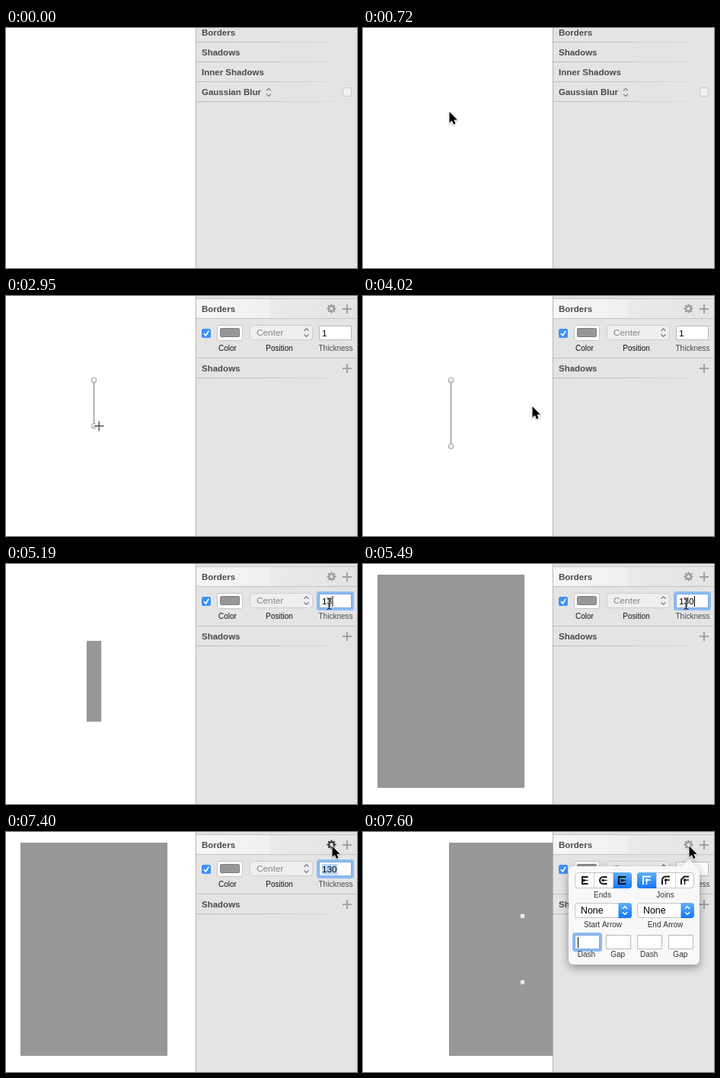
Recreate the animation shown at these times as an HTML page with a canvas. Size 461 px wide and 315 px high, loop 7.99 s.

```html
<!DOCTYPE html>
<html lang="en">
<head>
<meta charset="utf-8">
<title>Border thickness</title>
<style>
html, body { margin: 0; width: 100%; height: 100%; overflow: hidden; background: #fff; }
canvas { display: block; width: 461px; height: 315px; }
</style>
</head>
<body>
<canvas id="stage"></canvas>
<script>
const W = 461, H = 315, LOOP = 7990;
const canvas = document.getElementById('stage');
const c = canvas.getContext('2d');
const dpr = window.devicePixelRatio || 1;
canvas.width = W * dpr;
canvas.height = H * dpr;

const FONT = '"Liberation Sans", Arial, sans-serif';
const GRAY = '#979797', PANEL = '#e4e4e4', BLUE = '#3b91f7';
const UNIT = 1.485;               // screen pixels per unit of thickness
const LINE = { x: 115.5, top: 110.5, bottom: 197.3 };

// Stepped pointer moves: start, end, number of steps, way points
const MOVES = [
  { a: 300, b: 720, n: 9, pts: [[-12, 133], [30, 132], [85, 118], [113.5, 110]] },
  { a: 2360, b: 3150, n: 17, kind: 'cross', pts: [[114.5, 115.5], [117, 140], [122, 168], [123, 190.5]] },
  { a: 3290, b: 3400, n: 4, kind: 'cross', pts: [[123, 190.5], [123, 197.3]] },
  { a: 3720, b: 3720, n: 1, pts: [[123, 197], [122, 196]] },
  { a: 4020, b: 4550, n: 8, pts: [[122, 196], [323, 94], [415, 56], [448, 49], [424.5, 52]] },
  { a: 6690, b: 7400, n: 13, pts: [[424.5, 52], [437, 41], [441, 28], [428.5, 18.5]] }
];

function along(pts, f) {
  const p = f * (pts.length - 1);
  const i = Math.min(Math.floor(p), pts.length - 2);
  const [x0, y0] = pts[i], [x1, y1] = pts[i + 1];
  return [x0 + (x1 - x0) * (p - i), y0 + (y1 - y0) * (p - i)];
}

function pointer(t) {
  const m = MOVES.filter(v => t >= v.a).pop();
  if (!m) return null;
  const k = t >= m.b ? m.n : 1 + Math.floor((t - m.a) / (m.b - m.a) * (m.n - 1));
  const [x, y] = along(m.pts, k / m.n);
  const inField = x > 411 && x < 454 && y > 39 && y < 58;
  return { x, y, kind: m.kind || (inField ? 'beam' : 'arrow') };
}

function text(s, x, y, size, color = '#000', align = 'left', weight = '') {
  c.font = `${weight} ${size}px ${FONT}`;
  c.textAlign = align;
  c.fillStyle = color;
  c.fillText(s, x, y);
}

const heading = (s, y) => text(s, 257, y, 11.5, '#4a4a4a', 'left', 'bold');
const label = (s, x, y, color = '#111') => text(s, x, y, 10, color, 'center');

function rect(x, y, w, h, fill) {
  c.fillStyle = fill;
  c.fillRect(x, y, w, h);
}

function box(x, y, w, h, r, fill, stroke) {
  c.beginPath();
  c.roundRect(x, y, w, h, r);
  if (fill) { c.fillStyle = fill; c.fill(); }
  if (stroke) { c.strokeStyle = stroke; c.lineWidth = 1; c.stroke(); }
}

function poly(pts, color, width) {
  c.beginPath();
  pts.forEach(([x, y]) => c.lineTo(x, y));
  c.strokeStyle = color;
  c.lineWidth = width;
  c.stroke();
}

function gradient(x0, y0, x1, y1, ...stops) {
  const g = c.createLinearGradient(x0, y0, x1, y1);
  stops.forEach(([at, color]) => g.addColorStop(at, color));
  return g;
}

function separator(y) {
  rect(250, y, 180, 1, gradient(250, 0, 430, 0, [0, '#bebebe'], [0.6, '#c6c6c6'], [0.62, '#d2d2d2'], [1, '#dadada']));
}

function chevrons(x, y, color, width = 1.5) {
  for (const d of [-1, 1]) {
    poly([[x - 3, y + d * 2.2], [x, y + d * 5.2], [x + 3, y + d * 2.2]], color, width);
  }
}

function plus(x, y) {
  rect(x - 6, y - 1, 12, 2, '#a0a0a0');
  rect(x - 1, y - 6, 2, 12, '#a0a0a0');
}

function gear(x, y, color) {
  for (let i = 0; i < 8; i++) {
    const a = i * Math.PI / 4, dx = Math.cos(a), dy = Math.sin(a);
    poly([[x + dx * 3.5, y + dy * 3.5], [x + dx * 6, y + dy * 6]], color, 2);
  }
  c.beginPath();
  c.arc(x, y, 3.3, 0, 7);
  c.lineWidth = 2;
  c.stroke();
}

function field(x, y, w, h, focus) {
  if (focus) box(x - 3, y - 3, w + 6, h + 6, 3.5, '#8dbbf2');
  box(x + 0.5, y + 0.5, w - 1, h - 1, 0, '#fff', focus ? '#79a9e4' : '#b9b9b9');
}

function idlePanel() {
  ['Borders', 'Shadows', 'Inner Shadows', 'Gaussian Blur'].forEach((s, i) => {
    heading(s, 10 + 26 * i);
    separator(18 + 26 * i);
  });
  chevrons(345, 84.5, '#777', 1.1);
  box(442.5, 78.5, 11, 11, 2.5, '#f0f0f0', '#c8c8c8');
}

function thicknessField(t) {
  const focus = t >= 4750 && t < 7550;
  const value = t < 5140 ? '1' : t < 5490 ? '13' : '130';
  field(411, 39, 43, 19, focus);
  if (focus && t >= 6180) rect(415, 42, 20.5, 14, '#b2d6fd');
  text(value, 415, 53, 11.8);
  if (focus && t < 6030) rect(415.5 + value.length * 6.5, 42, 1, 14, '#000');
}

function borderPanel(t, hover) {
  rect(250, 4, 211, 25, gradient(250, 0, 461, 0, [0, '#f6f6f6'], [0.46, '#f0f0f0'], [0.465, '#eaeaea'], [1, '#e4e4e4']));
  rect(250, 3, 211, 1, '#c4c4c4');
  rect(250, 29, 211, 1, '#c4c4c4');
  heading('Borders', 21);
  gear(427.5, 16.5, hover ? '#303030' : '#969696');
  plus(448, 17);

  box(257, 43, 12, 12, 2.5, BLUE);
  poly([[260, 49], [262.4, 52], [266.3, 45.6]], '#fff', 1.6);
  box(277.5, 38.5, 33, 20, 3, '#fff', '#c2c2c2');
  box(281.5, 42.5, 25, 11, 1, GRAY, '#7c7c7c');
  box(320.5, 38.5, 82, 19, 3.5, '#efefef', '#cecece');
  text('Center', 329, 52.3, 11.8, '#858585');
  chevrons(394.5, 48, '#888');
  thicknessField(t);
  label('Color', 291, 72.3);
  label('Position', 359, 72.3);
  label('Thickness', 433, 72.3, '#4a4a4a');

  rect(250, 81, 211, 1, '#c4c4c4');
  heading('Shadows', 99);
  plus(448, 95);
  separator(107);
}

function handle(x, y) {
  box(x - 3, y - 3, 6, 6, 1.5, gradient(0, y - 3, 0, y + 3, [0, '#fff'], [1, '#d8d8d8']), '#a6a6a6');
}

function drawing(t, p) {
  if (t < 2100) return;
  const shift = t >= 7550 ? 94 : 0;
  const x = LINE.x + shift;
  const bottom = t < 2360 ? LINE.top : p.kind === 'cross' ? p.y : LINE.bottom;
  const thick = t < 5190 ? 1 : t < 5490 ? 13 : 130;
  const half = thick * UNIT / 2;
  const cap = thick > 1 ? half : 0;
  if (bottom > LINE.top) {
    rect(x - half, LINE.top - cap, half * 2, bottom - LINE.top + cap * 2, GRAY);
  }
  if (t < 5190 || shift) {
    handle(x, LINE.top);
    if (bottom > LINE.top) handle(x, bottom);
  }
}

function segments(x, active, icon) {
  box(x + 0.5, 53.5, 74, 20, 4, '#fff', '#c5c5c5');
  const w = 25;
  c.save();
  box(x, 53, 75, 21, 4);
  c.clip();
  rect(x + active * w, 53, w, 21, gradient(0, 53, 0, 74, [0, '#5fb0fb'], [1, '#1577f4']));
  c.restore();
  for (let i = 0; i < 3; i++) {
    if (i) rect(x + i * w, 54, 1, 19, '#d5d5d5');
    icon(i, x + i * w + 12.5, 63.5);
  }
}

function endIcon(i, x, y) {
  const ink = '#151515';
  if (i === 1) {
    poly([[x + 5, y - 4.5], [x, y - 4.5]], ink, 2);
    c.beginPath();
    c.arc(x, y, 4.5, Math.PI / 2, Math.PI * 1.5);
    c.stroke();
    poly([[x, y + 4.5], [x + 5, y + 4.5]], ink, 2);
  } else {
    const left = i ? x - 4.5 : x - 2.5;
    poly([[x + 5, y - 4.5], [left, y - 4.5], [left, y + 4.5], [x + 5, y + 4.5]], ink, 2);
  }
  poly([[x - 1.5, y], [x + 5, y]], ink, 1.2);
  rect(x - 2, y - 1.5, 3, 3, ink);
}

function joinIcon(i, x, y) {
  const ink = i ? '#151515' : '#fff';
  c.beginPath();
  c.moveTo(x - 4.5, y + 5.5);
  if (i === 0) c.lineTo(x - 4.5, y - 5);
  if (i === 1) { c.lineTo(x - 4.5, y); c.quadraticCurveTo(x - 4.5, y - 5, x + 0.5, y - 5); }
  if (i === 2) { c.lineTo(x - 4.5, y - 1); c.lineTo(x - 0.5, y - 5); }
  c.lineTo(x + 5.5, y - 5);
  c.strokeStyle = ink;
  c.lineWidth = 2;
  c.stroke();
  poly([[x, y + 5.5], [x, y - 0.5], [x + 5.5, y - 0.5]], ink, 1.4);
  rect(x - 1.5, y - 2, 3, 3, ink);
}

function select(x) {
  box(x + 0.5, 93.5, 74, 19, 3.5, '#fff', '#c5c5c5');
  box(x + 57.5, 93, 17.5, 20, [0, 4, 4, 0], gradient(0, 93, 0, 113, [0, '#5fb0fb'], [1, '#1577f4']));
  chevrons(x + 66, 103, '#fff');
  text('None', x + 8, 107.3, 12.4);
}

function popover(alpha) {
  c.save();
  c.globalAlpha = alpha;
  c.shadowColor = 'rgba(0,0,0,0.38)';
  c.shadowBlur = 12 * dpr;
  c.shadowOffsetY = 4 * dpr;
  c.beginPath();
  c.roundRect(270, 45, 172, 129, 6);
  c.moveTo(418, 45.5);
  c.lineTo(428, 36);
  c.lineTo(438, 45.5);
  c.closePath();
  c.fillStyle = '#f8f8f8';
  c.fill();
  c.shadowColor = 'transparent';

  segments(278, 2, endIcon);
  segments(360, 0, joinIcon);
  label('Ends', 314.5, 86.3, '#333');
  label('Joins', 397, 86.3, '#333');
  select(278);
  select(360);
  label('Start Arrow', 315, 125.3, '#333');
  label('End Arrow', 397, 125.3, '#333');
  ['Dash', 'Gap', 'Dash', 'Gap'].forEach((s, i) => {
    const x = 278 + i * 41.1;
    field(Math.round(x), 135, 33, 19, i === 0);
    label(s, x + 15.5, 164.3, '#333');
  });
  rect(282, 138, 1, 14, '#000');
  c.restore();
}

function arrow(x, y) {
  c.save();
  c.translate(x, y);
  c.beginPath();
  [[0, 0], [0, 14.5], [3.3, 11.4], [5.5, 16.4], [8, 15.3], [5.9, 10.4], [10.3, 10.4]]
    .forEach(([px, py]) => c.lineTo(px, py));
  c.closePath();
  c.shadowColor = 'rgba(0,0,0,0.3)';
  c.shadowBlur = 2 * dpr;
  c.shadowOffsetY = dpr;
  c.lineJoin = 'round';
  c.lineWidth = 1.8;
  c.strokeStyle = '#fff';
  c.stroke();
  c.shadowColor = 'transparent';
  c.fillStyle = '#000';
  c.fill();
  c.restore();
}

function cross(x, y) {
  for (const [color, w] of [['#fff', 2.6], ['#222', 1.1]]) {
    poly([[x - 6.5, y], [x + 6.5, y]], color, w);
    poly([[x, y - 6.5], [x, y + 6.5]], color, w);
  }
}

function beam(x, y) {
  const ink = '#222';
  poly([[x, y - 6], [x, y + 6]], ink, 1.3);
  poly([[x - 2, y + 3], [x + 2, y + 3]], ink, 1);
  for (const d of [-1, 1]) {
    poly([[x - 3, y + d * 7.5], [x - 1.5, y + d * 7.3], [x, y + d * 6], [x + 1.5, y + d * 7.3], [x + 3, y + d * 7.5]], ink, 1.2);
  }
}

const CURSORS = { arrow, cross, beam };

function draw(t) {
  const p = pointer(t);
  c.setTransform(dpr, 0, 0, dpr, 0, 0);
  rect(0, 0, W, H, '#fff');
  drawing(t, p);
  rect(249, 0, 212, H, PANEL);
  rect(249, 0, 1, H, '#b4b4b4');
  if (t < 2040) idlePanel();
  else borderPanel(t, t >= 7350 && t < 7550);
  if (t >= 7550) popover(t < 7600 ? 0.6 : 1);
  if (p) CURSORS[p.kind](p.x, p.y);
}

const start = performance.now();
function tick() {
  draw((performance.now() - start) % LOOP);
  requestAnimationFrame(tick);
}
tick();
</script>
</body>
</html>
```
